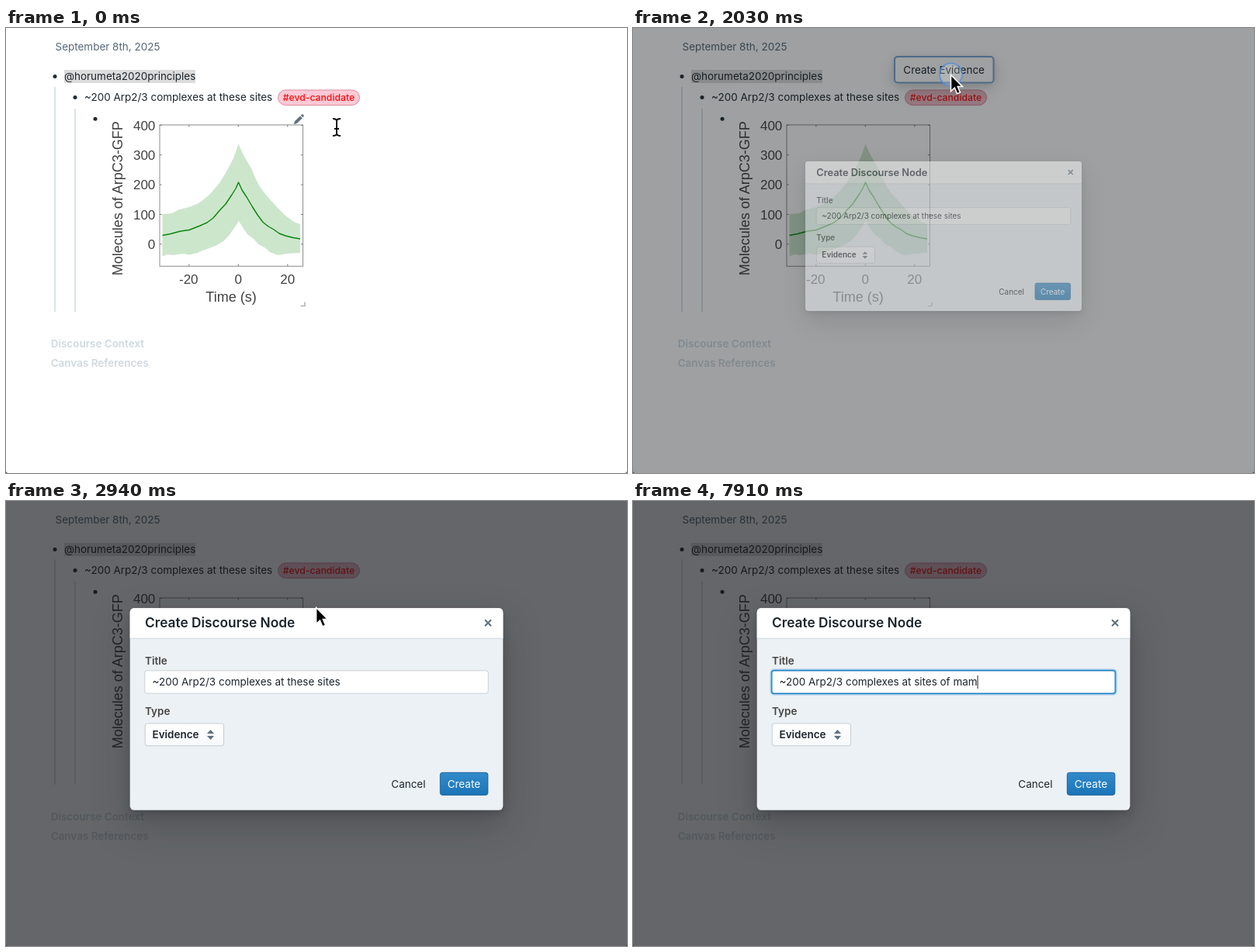
Animation, 800 px wide and 574 px high, one loop 8 s. Source, as an HTML page:

```html
<!DOCTYPE html>
<html lang="en">
<head>
<meta charset="utf-8">
<title>Create a discourse node</title>
<style>
  html, body { margin: 0; width: 100%; height: 100%; overflow: hidden; background: #fff; }
  svg { display: block; width: 800px; height: 574px; }
  text { font: 13.47px Inter, sans-serif; fill: #1c252c; white-space: pre; }
  .semi { font-weight: 600; }
  .faint { font-weight: 600; fill: #ced9e0; }
  .label { font-weight: 600; fill: #444; }
  .plot text { font: 17px "Liberation Sans", Arial, sans-serif; fill: #404040; }
  .plot .axis { font-size: 18px; text-anchor: middle; }
  .popShadow { filter: drop-shadow(0 2px 4px rgba(16,22,26,.12)) drop-shadow(0 8px 12px rgba(16,22,26,.14)); }
  .modalShadow { filter: drop-shadow(0 4px 4px rgba(16,22,26,.2)) drop-shadow(0 18px 23px rgba(16,22,26,.25)); }
</style>
</head>
<body>
<svg viewBox="0 0 800 574">
  <defs>
    <linearGradient id="blue" x2="0" y2="1"><stop stop-color="#338bca"/><stop offset="1" stop-color="#1a74b6"/></linearGradient>
    <linearGradient id="light" x2="0" y2="1"><stop stop-color="#fff"/><stop offset="1" stop-color="#f6f9fb"/></linearGradient>
  </defs>

  <g id="page">
    <text x="63.5" y="28.5" style="fill:#566878">September 8th, 2025</text>
    <rect x="75" y="54" width="169" height="17" fill="#dcdcdc"/>
    <text x="75" y="67">@horumeta2020principles</text>
    <text x="101" y="94">~200 Arp2/3 complexes at these sites</text>
    <g fill="#202b33"><circle cx="63" cy="62.5" r="2.5"/><circle cx="89" cy="89.5" r="2.5"/><circle cx="115" cy="117.2" r="2.5"/></g>
    <path d="M63 76V366M89 104V366" stroke="#cfdadf" stroke-width="1.5"/>
    <rect id="tag" x="350.5" y="80" width="105" height="19.5" rx="9.75" stroke="#df8ba0"/>
    <text x="356.8" y="94" style="font-size:12.2px;font-weight:500;fill:#f50f0f">#evd-candidate</text>

    <g class="plot">
      <path id="band" fill="#cce6cc"/>
      <path id="mean" fill="none" stroke="#0a840a" stroke-width="1.4" stroke-linejoin="round"/>
      <rect x="198" y="125" width="184.5" height="182.3" fill="none" stroke="#8c8c8c"/>
      <path id="ticks" stroke="#777"/>
      <g id="tickLabels"></g>
      <text class="axis" x="290" y="352.5">Time (s)</text>
      <text class="axis" transform="translate(149.5 219.8) rotate(-90)">Molecules of ArpC3-GFP</text>
    </g>
    <path d="M379.5 358.5H385V353.5" fill="none" stroke="#999" stroke-width="1.2"/>
    <path id="pencil" d="M370.8 124.3l1.2-4 7-6.8 2.8 2.8-7 6.8zM379.8 112.7l1.2-1.2q1-.8 2 .2t.6 2.3l-1.2 1.2z" fill="#5c7080"/>

    <text class="faint" x="57.7" y="412.3">Discourse Context</text>
    <text class="faint" x="57.7" y="436.6">Canvas References</text>

    <g id="popover">
      <rect class="popShadow" x="337" y="37" width="127.5" height="33.5" rx="4" fill="#fff" stroke="#78a3d4" stroke-width="2"/>
      <text x="348.3" y="58.7">Create Evidence</text>
    </g>
  </g>

  <rect id="backdrop" width="800" height="574" fill="#101418"/>

  <g id="modal">
    <rect class="modalShadow" x="159.7" y="138.3" width="480.6" height="260.5" rx="5.5" fill="#ebf1f5"/>
    <path d="M159.7 176.8V143.8q0-5.5 5.5-5.5H634.800q5.500 0 5.500 5.500V176.800z" fill="#fff"/>
    <path d="M159.700 177.300H640.300" stroke="#d3d8dc"/>
    <text class="semi" x="179" y="163.3" style="font-size:17.3px">Create Discourse Node</text>
    <path d="M617 153.200l8 8m0-8l-8 8" stroke="#5c7080" stroke-width="2"/>
    <text class="label" x="179" y="210.600">Title</text>
    <rect id="glow" x="178" y="218" width="444" height="31" rx="4" fill="none" stroke="#9cc7e6" stroke-width="3"/>
    <rect id="field" x="178.800" y="218.800" width="442.400" height="29.400" rx="3" fill="#fff"/>
    <rect id="selection" y="224.500" height="18" fill="#b3d7fe"/>
    <text id="value" x="188.500" y="238.300"></text>
    <path id="caret" d="M0 225V242" stroke="#222"/>
    <text class="label" x="179" y="276.300">Type</text>
    <rect x="179.200" y="287" width="101.300" height="28.800" rx="3" fill="url(#light)" stroke="#c6cdd2"/>
    <text class="semi" x="188.500" y="306.300">Evidence</text>
    <path d="M259 300l4.500-5 4.500 5zM259 303l4.500 5 4.500-5z" fill="#5c7080"/>
    <text x="496.300" y="370">Cancel</text>
    <rect x="559.300" y="350.300" width="61.500" height="29" rx="3" fill="url(#blue)" stroke="#1a629b"/>
    <text x="568.700" y="370" style="fill:#fff">Create</text>
  </g>

  <g id="pointer">
    <circle id="ring" r="14.500" cy="-.5" fill="#fff" fill-opacity=".2" stroke="#4f8ee0" stroke-opacity=".75" stroke-width="2"/>
    <path id="arrow" d="M0 0V21l4.800-4.400 3.300 7.700 3.900-1.600-3.300-7.600H15z" fill="#000" stroke="#fff" stroke-width="1.500"/>
    <g id="beam" fill="none">
      <path id="beamHalo" stroke="#fff" stroke-width="4"/>
      <path id="beamCore" stroke="#000" stroke-width="1.800"/>
    </g>
  </g>
  <path d="M0 571v3h3q-3 0-3-3zM800 571v3h-3q3 0 3-3z" fill="#444"/>
</svg>

<script>
const LOOP = 8000, STEP = 70, OPEN_AT = 1963;
const $ = id => document.getElementById(id);
const set = (id, attrs) => { for (const k in attrs) $(id).setAttribute(k, attrs[k]); };
const show = (id, on) => set(id, { visibility: on ? "visible" : "hidden" });
const clamp = v => Math.min(1, Math.max(0, v));

function bezier(x1, y1, x2, y2) {
  const at = (a, b, s) => 3 * (1 - s) ** 2 * s * a + 3 * (1 - s) * s * s * b + s ** 3;
  return x => {
    let lo = 0, hi = 1;
    for (let i = 0; i < 24; i++) {
      const mid = (lo + hi) / 2;
      if (at(x1, x2, mid) < x) lo = mid; else hi = mid;
    }
    return at(y1, y2, lo);
  };
}
const fade = bezier(.4, 1, .75, .9), bounce = bezier(.54, 1.12, .38, 1.11), glide = bezier(.42, 0, .3, 1);
const progress = (t, start, span) => clamp((t - start) / span);

// Chart
const upper = "201.5 240 214 239 222 234.500 236 231 248 226 255 221 262 215 268 208 275 200 283 187 293 168 299.500 149.500 304 160 310 171 316 181 321 193 326 203 333 213 350 232 360 242 371 250 379 253";
const lower = "379 290 362 291 350 293 340 289 333 283 325 279 319 272 311 266 306 259 300 249 294 258 287 268 280 275 270 281 253 287 247 290 236 292.500 228 291 215 293 208 292 201.500 294.500";
set("band", { d: `M${upper} ${lower}z` });
set("mean", { d: "M201.500 267.500 212 265.500 225 262 236 260.500 250 255 259 251 267 245 275 235.500 283 227 291 215 296 207 299.500 199 304 209 310 218 317 230 324 241 331 250.500 338 256 345 260 352 265 360 268 370 270.500 379 272" });
let ticks = "", labels = "";
for (let v = 0; v <= 400; v += 100) {
  const y = 278.8 - v * .3835;
  ticks += `M198 ${y}h2.500M382.500 ${y}h-2.500`;
  labels += `<text x="192.300" y="${y + 6.2}" text-anchor="end">${v}</text>`;
}
for (let s = -20; s <= 20; s += 20) {
  const x = 299.3 + s * 3.175;
  ticks += `M${x} 125v2.500M${x} 307v-2.500`;
  labels += `<text x="${x - (s < 0 ? .5 : 0)}" y="329.800" text-anchor="middle">${s}</text>`;
}
set("ticks", { d: ticks });
$("tickLabels").innerHTML = labels;

const beam = "M-5-11q5 0 5 3 0-3 5-3M0-8V8M-5 11q5 0 5-3 0 3 5 3M-3 2H3";
set("beamHalo", { d: beam });
set("beamCore", { d: beam });

// Field states: time, text, caret index (-1 = hidden)
const head = "~200 Arp2/3 complexes at", short = head + " sites";
const edits = [
  [0, head + " these sites", -1],
  [4970, head + "  sites", head.length + 1],
  [5180, short, head.length],
  [5670, short, -1],
  [6020, short, short.length],
  [6580, short, -1]
];
const typed = " of mam";
[6650, 6790, 7070, 7140, 7560, 7770, 7910].forEach((time, i) => {
  const text = short + typed.slice(0, i + 1);
  edits.push([time, text, text.length]);
});

// Pointer path: time, x, y
const path = [
  [0, 426, 128], [140, 426, 128], [560, 424, 90], [950, 424, 90], [1680, 409.5, 60.5],
  [2590, 409.5, 60.5], [3150, 398, 150], [3290, 398, 150], [3800, 374, 229], [LOOP, 374, 229]
];
function pointerAt(t) {
  const i = path.findIndex(p => p[0] > t);
  const [t0, x0, y0] = path[i - 1], [t1, x1, y1] = path[i];
  const k = glide((t - t0) / (t1 - t0));
  return [x0 + (x1 - x0) * k, y0 + (y1 - y0) * k];
}

const zoom = (scale, cx, cy) => `translate(${cx} ${cy}) scale(${scale}) translate(${-cx} ${-cy})`;
const between = (t, a, b) => t >= a && t < b;

function drawField(t) {
  const [, text, index] = edits.filter(e => e[0] <= t).pop();
  const value = $("value");
  if (value.textContent !== text) value.textContent = text;
  const xAt = n => 188.5 + value.getSubStringLength(0, n);

  const focused = t >= 3850;
  show("glow", focused);
  set("field", { stroke: focused ? "#1f82c4" : "#c9d0d5", "stroke-width": focused ? 1.4 : 1 });

  const selected = between(t, 4060, 4970);
  show("selection", selected);
  if (selected) {
    const from = xAt(head.length + 1);
    set("selection", { x: from, width: xAt(head.length + 6) - from });
  }
  show("caret", index >= 0);
  if (index >= 0) set("caret", { transform: `translate(${xAt(index) + .5} 0)` });
}

function drawPointer(t) {
  const [x, y] = pointerAt(t);
  const isBeam = t < OPEN_AT ? y > 100 : y > 218;
  const visible = t < 4970;
  set("pointer", { transform: `translate(${x} ${y})` });
  show("beam", visible && isBeam);
  show("arrow", visible && !isBeam);
  show("ring", between(t, 1890, 2130) || between(t, 3850, 4130));
  show("pencil", t < OPEN_AT && y > 108);
}

function draw(t) {
  const pop = progress(t, 600, 300);
  set("popover", {
    opacity: clamp(bounce(pop)) * (1 - progress(t, 2300, 140)),
    transform: zoom(.3 + .7 * bounce(pop), 400, 76)
  });
  set("tag", { fill: t < 560 ? "#fcc9d5" : "#f0bcc7" });

  const open = bounce(progress(t, OPEN_AT, 300));
  set("backdrop", { opacity: .648 * fade(progress(t, OPEN_AT, 200)) });
  set("modal", { opacity: clamp(open), transform: zoom(.5 + .5 * open, 400, 268.5) });
  $("modal").style.display = t < OPEN_AT ? "none" : "";
  if (t >= OPEN_AT) drawField(t);
  drawPointer(t);
}

const start = performance.now();
function frame() {
  const t = Math.max(0, performance.now() - start) % LOOP;
  draw(Math.floor(t / STEP) * STEP);
  requestAnimationFrame(frame);
}
frame();
</script>
</body>
</html>
```
